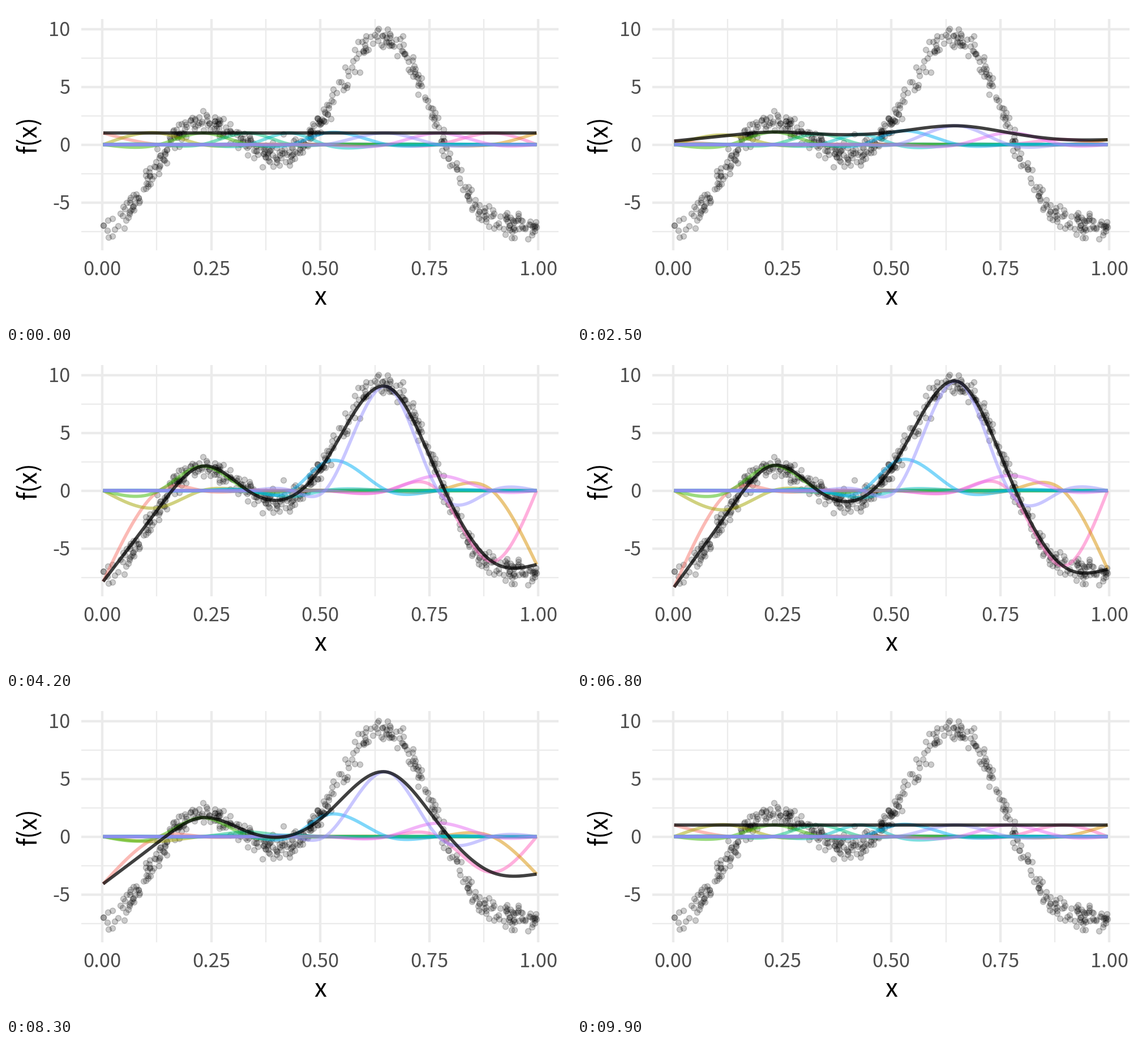
Animation, 998 px wide and 561 px high, one loop 10 s. Source, as a matplotlib script:

```python
import math

import numpy as np
import matplotlib.pyplot as plt
from matplotlib.animation import FuncAnimation

W, H, DPI = 998, 561, 72          # at 72 dpi one point is one pixel
FRAMES, INTERVAL = 100, 100
FONT = "Noto Sans CJK JP"
N, K = 500, 10


def px(x):
    return 170.2 + 770.2 * np.asarray(x)


def py(y):
    return 244.5 - 20.4 * np.asarray(y)


# --- sample data -----------------------------------------------------------
def uniform_stream(seed):
    """Mersenne Twister seeded by a linear congruential scramble, as in R."""
    state = []
    for _ in range(51 + 624):
        seed = (69069 * seed + 1) % 2**32
        state.append(seed)
    rng = np.random.RandomState()
    rng.set_state(("MT19937", np.array(state[51:], dtype=np.uint32), 624))
    return lambda n: rng.randint(0, 2**32, n, dtype=np.uint32) / 2.0**32


def truth(x):
    return x**11 * (10 * (1 - x))**6 + 10 * (10 * x)**3 * (1 - x)**10


def normal_quantile(p):
    z = np.linspace(-5, 5, 4001)
    cdf = [0.5 * (1 + math.erf(v / math.sqrt(2))) for v in z]
    return np.interp(p, cdf, z)


draw_uniform = uniform_stream(1)
data_x = draw_uniform(N)
noise = normal_quantile(draw_uniform(2 * N)[::2])
data_y = truth(data_x) + 0.5 * noise
data_y -= data_y.mean()


# --- cardinal natural cubic spline basis -----------------------------------
def spline_basis(knots, x):
    k, h = len(knots), np.diff(knots)
    system, rhs = np.eye(k), np.zeros((k, k))
    for i in range(1, k - 1):
        system[i, i - 1:i + 2] = h[i - 1], 2 * (h[i - 1] + h[i]), h[i]
        rhs[i, i - 1:i + 2] = 6 / h[i - 1], -6 / h[i - 1] - 6 / h[i], 6 / h[i]
    curvature = np.linalg.solve(system, rhs)
    j = np.clip(np.searchsorted(knots, x) - 1, 0, k - 2)
    step = h[j]
    a, b = (knots[j + 1] - x) / step, (x - knots[j]) / step
    eye = np.eye(k)
    bend_a, bend_b = (a**3 - a) * step**2 / 6, (b**3 - b) * step**2 / 6
    return (a[:, None] * eye[j] + b[:, None] * eye[j + 1]
            + bend_a[:, None] * curvature[j] + bend_b[:, None] * curvature[j + 1])


knots = np.quantile(data_x, np.linspace(0, 1, K))
fitted = np.linalg.lstsq(spline_basis(knots, data_x), data_y, rcond=None)[0]
grid_x = np.linspace(knots[0], knots[-1], 400)
basis = spline_basis(knots, grid_x)

COLORS = ["#F8766D", "#A3A500", "#39B600", "#00BF7D", "#00BFC4",
          "#00B0F6", "#9590FF", "#E76BF3", "#FF62BC", "#D89000"]
STACK = [8, 0, 9, 1, 2, 3, 4, 5, 7, 6]      # bottom to top


# --- timing ----------------------------------------------------------------
def cubic_in_out(u):
    u = min(max(u, 0), 1)
    return 4 * u**3 if u < 0.5 else 1 - 4 * (1 - u)**3


def progress(frame):
    if frame <= 60:
        return cubic_in_out((frame - 16) / 34)
    return 1 - cubic_in_out((frame - 67) / 33)


# --- figure ----------------------------------------------------------------
fig = plt.figure(figsize=(W / DPI, H / DPI), dpi=DPI, facecolor="white")
ax = fig.add_axes([0, 0, 1, 1])
ax.set_xlim(0, W)
ax.set_ylim(H, 0)
ax.axis("off")


def grid(xs, ys, width):
    style = dict(color="#EBEBEB", lw=width, solid_capstyle="butt", zorder=0)
    for x in px(xs):
        ax.plot([x, x], [22.5, 430.5], **style)
    for y in py(ys):
        ax.plot([133.5, 976], [y, y], **style)


def label(x, y, text, size, color, ha="center", rotation=0):
    ax.text(x, y, text, fontsize=size, color=color, family=FONT, ha=ha,
            va="baseline", rotation=rotation, rotation_mode="anchor")


x_ticks = np.arange(5) / 4
y_ticks = np.array([-5, 0, 5, 10])
grid(x_ticks[:-1] + 0.125, y_ticks - 2.5, 2.2)
grid(x_ticks, y_ticks, 4.4)
for tick in x_ticks:
    label(px(tick), 474.5, f"{tick:.2f}", 34.5, "#4D4D4D")
for tick in y_ticks:
    label(113.5, py(tick) + 12, str(tick), 34.5, "#4D4D4D", ha="right")
label(555, 527, "x", 44, "black")
label(54, 227, "f(x)", 44, "black", rotation=90)

ax.scatter(px(data_x), py(data_y), s=10**2, facecolor=(0, 0, 0, 0.2),
           edgecolor=(0, 0, 0, 0.2), linewidth=1.5, zorder=1)


def curve(color, alpha, zorder):
    return ax.plot(px(grid_x), py(0 * grid_x), color=color, alpha=alpha,
                   lw=5.7, solid_capstyle="butt", zorder=zorder)[0]


parts = {i: curve(COLORS[i], 0.5, 2 + z / 10) for z, i in enumerate(STACK)}
total = curve("black", 0.75, 4)


def update(frame):
    weights = 1 + (fitted - 1) * progress(frame)
    for i, line in parts.items():
        line.set_ydata(py(basis[:, i] * weights[i]))
    total.set_ydata(py(basis @ weights))
    return [*parts.values(), total]


anim = FuncAnimation(fig, update, frames=FRAMES, interval=INTERVAL,
                     repeat=True, repeat_delay=0, blit=False)
plt.show()
```
